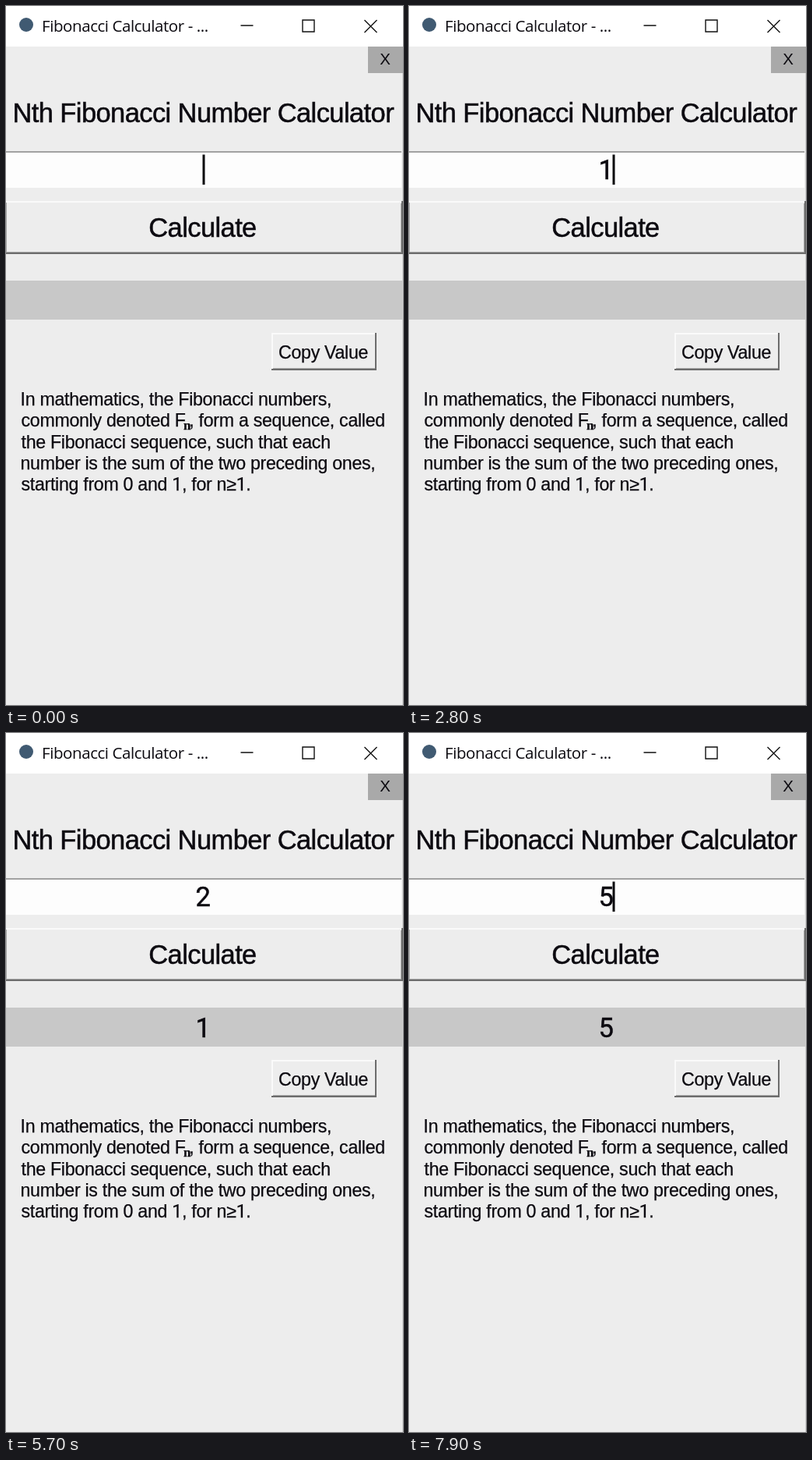
Recreate the animation shown at these times as an HTML page. Size 510 px wide and 896 px high, loop 8 s.

```html
<!DOCTYPE html>
<html lang="en">
<head>
<meta charset="utf-8">
<title>Fibonacci Calculator</title>
<style>
  html, body { margin: 0; height: 100%; overflow: hidden; background: #ededed; }
  svg { display: block; width: 100%; height: 100%; }
  text { font-family: "Liberation Sans", Arial, sans-serif; fill: #0c0a10; }
  .caption { font: 20.5px "Open Sans", "Noto Sans", sans-serif; letter-spacing: -.42px; }
  .large { font-size: 34.5px; letter-spacing: -.6px; stroke: #0c0a10; stroke-width: .5px; }
  .small { font-size: 23.2px; letter-spacing: -.3px; stroke: #0c0a10; stroke-width: .25px; }
  .digit { font-family: Roboto, "Noto Sans", sans-serif; }
  .sub { font: bold 17px "Liberation Serif", serif; }
  .middle { text-anchor: middle; }
  .light { fill: #fafafa; }
  .shade { fill: #a6a6a6; }
  .dark { fill: #6c6c6c; }
  .pressed .light { fill: #6c6c6c; }
  .pressed .dark, .pressed .shade { fill: #fafafa; }
  .pressed text { transform: translate(2px, 2px); }
</style>
</head>
<body>
<svg viewBox="0 0 510 896">
  <rect width="510" height="896" fill="#ededed"/>
  <rect x="509" y="52" width="1" height="844" fill="#d2d2d2"/>

  <rect width="510" height="52" fill="#fff"/>
  <circle cx="26" cy="24" r="9" fill="#405a72"/>
  <text class="caption" x="46" y="33">Fibonacci Calculator - ...</text>
  <path d="M301.500 25h16M381 18h15v15h-15zM460.500 18l16 16m0-16l-16 16" fill="none" stroke="#111" stroke-width="1.4"/>

  <rect x="465" y="52" width="45" height="34" fill="#a9a9a9"/>
  <text class="middle" x="487" y="74.500" font-size="20.500">X</text>

  <text class="large" x="8.500" y="149">Nth Fibonacci Number Calculator</text>

  <rect y="186" width="508" height="2" fill="#a2a2a2"/>
  <rect y="188" width="508" height="45" fill="#fdfdfd"/>
  <text class="large digit middle" id="entry" x="253" y="222"></text>
  <rect id="caret" y="190.500" width="3" height="38.500" fill="#08080c"/>

  <g id="calculate">
    <path class="light" d="M0 250h510v2H0z"/>
    <path class="shade" d="M0 252h1v64H0zM1 315h506v-62h1v63H1z"/>
    <path class="dark" d="M0 316h508v-66h2v68H0z"/>
    <text class="large middle" x="252.500" y="296">Calculate</text>
  </g>

  <rect y="352" width="509" height="50" fill="#c8c8c8"/>
  <text class="large digit middle" id="result" x="253" y="390"></text>

  <path class="light" d="M341 419h135v2H343v46h-2z"/>
  <path class="shade" d="M343 464h131v1H343z"/>
  <path class="dark" d="M341 465h133v-46h2v48H341z"/>
  <text class="small" x="350" y="452">Copy Value</text>

  <g class="small">
    <text x="18.500" y="512">In mathematics, the Fibonacci numbers,</text>
    <text x="19.500" y="539.300">commonly denoted F<tspan class="sub" x="228" dy="4">n</tspan><tspan x="235.300" dy="-4">, form a sequence, called</tspan></text>
    <text x="19.500" y="566.500">the Fibonacci sequence, such that each</text>
    <text x="18.500" y="594">number is the sum of the two preceding ones,</text>
    <text x="19.500" y="621.300">starting from 0 and <tspan class="digit">1</tspan>, for n≥<tspan class="digit">1</tspan>.</text>
  </g>
</svg>
<script>
  const LOOP = 8000;
  const entrySteps = [[0, ""], [2300, "1"], [5200, ""], [5500, "2"], [7000, ""], [7400, "5"]];
  const resultSteps = [[0, ""], [4700, "1"], [7800, "5"]];
  const presses = [4600, 5900, 7700];
  const PRESS_TIME = 100;

  const [entry, caret, calculate, result] =
    ["entry", "caret", "calculate", "result"].map(id => document.getElementById(id));

  const valueAt = (steps, t) => steps.filter(([start]) => start <= t).pop()[1];

  function render(t) {
    const typed = valueAt(entrySteps, t);
    const blink = t % 900;
    entry.textContent = typed;
    result.textContent = valueAt(resultSteps, t);
    caret.setAttribute("x", typed ? 261.5 : 252.5);
    caret.setAttribute("visibility", blink >= 300 && blink < 600 ? "hidden" : "visible");
    const pressed = presses.some(start => t >= start && t < start + PRESS_TIME);
    calculate.classList.toggle("pressed", pressed);
  }

  const origin = performance.now();
  function tick() {
    render((performance.now() - origin) % LOOP);
    requestAnimationFrame(tick);
  }
  tick();
</script>
</body>
</html>
```
